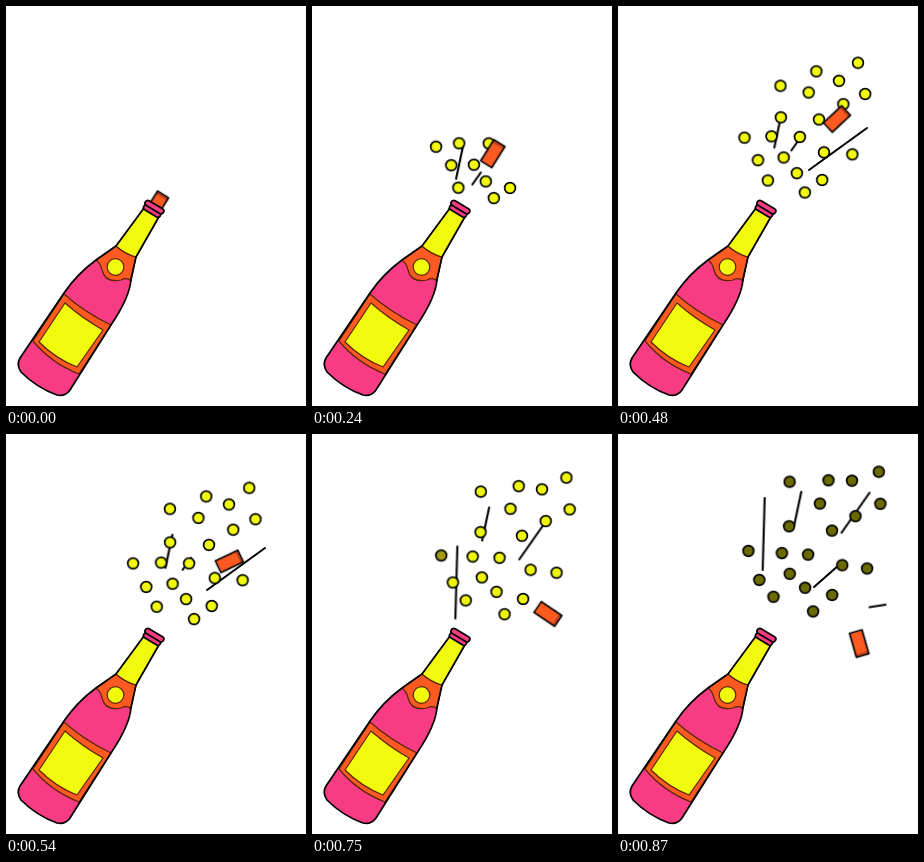
An HTML page without scripts that plays this animation: 300x400 px, repeating every 0.9 s.

```html
<!DOCTYPE html>
<html lang="en">
<head>
<meta charset="utf-8">
<title>Popping bottle</title>
<style>
  html, body { margin: 0; width: 100%; height: 100%; overflow: hidden; background: #fff; }
  svg { display: block; width: 100%; height: 100%; }

  .pink { fill: #f83c84; }
  .orange { fill: #fc5a21; }
  .yellow { fill: #f1f90d; }
  .ink { stroke: #000; stroke-width: 1.7; stroke-linejoin: round; stroke-linecap: round; }
  .thin { stroke: #5a2408; stroke-width: 1.2; stroke-linejoin: round; }
  .streaks { stroke-width: 2.1; }

  .dots, .streaks, .dots *, .streaks *, .cork {
    animation: 0.9s -2ms infinite;
  }

  /* Steady drift; --dx and --dy are the travel in one loop, drawn as placed at 70%. */
  .dots circle, .streaks path {
    animation-name: drift;
    animation-timing-function: steps(30);
  }
  .dots circle { r: 5.4px; }
  @keyframes drift {
    from { transform: translate(calc(var(--dx) * -0.7px), calc(var(--dy) * -0.7px)); }
    to { transform: translate(calc(var(--dx) * 0.3px), calc(var(--dy) * 0.3px)); }
  }

  .dots { fill: #f1f90d; animation-name: dim; animation-timing-function: linear; }
  .dots .early { animation-name: drift, dim-early; animation-timing-function: steps(30), linear; }
  @keyframes dim {
    0%, 83.3% { fill: #f1f90d; }
    95%, 100% { fill: #6b6a00; }
  }
  @keyframes dim-early {
    0%, 76.7% { fill: #f1f90d; }
    83.3% { fill: #a39d15; }
    90%, 100% { fill: #6b6a00; }
  }

  /* Hard appearances */
  .dots g, .streaks g { animation-timing-function: step-end; }
  .dots .first, .streaks .first { animation-name: first; }
  .dots .second { animation-name: second; }
  .dots .third { animation-name: third; }
  .streaks .spark { animation-name: spark; }
  .streaks .ray { animation-name: ray; }
  .streaks .fourth { animation-name: fourth; }
  .streaks .fifth { animation-name: fifth; }
  .streaks .last { animation-name: last; }
  @keyframes first { 0% { opacity: 0; } 16.6%, 100% { opacity: 1; } }
  @keyframes second { 0% { opacity: 0; } 33.3%, 100% { opacity: 1; } }
  @keyframes third { 0% { opacity: 0; } 46.6%, 100% { opacity: 1; } }
  @keyframes spark { 0% { opacity: 0; } 16.6% { opacity: 1; } 63.3%, 100% { opacity: 0; } }
  @keyframes ray { 0% { opacity: 0; } 33.3% { opacity: 1; } 63.3%, 100% { opacity: 0; } }
  @keyframes fourth { 0% { opacity: 0; } 63.3%, 100% { opacity: 1; } }
  @keyframes fifth { 0% { opacity: 0; } 76.6%, 100% { opacity: 1; } }
  @keyframes last { 0% { opacity: 0; } 86.6%, 100% { opacity: 1; } }

  .cork { animation-name: fly; }
  @keyframes fly {
    0% { transform: translate(150.5px, 199px) rotate(32deg); animation-timing-function: steps(12); }
    40% { transform: translate(196px, 122px) rotate(32deg); animation-timing-function: steps(2); }
    46.667% { transform: translate(207px, 110px) rotate(34deg); animation-timing-function: steps(2); }
    53.333% { transform: translate(219px, 113px) rotate(47deg); animation-timing-function: steps(5); }
    70% { transform: translate(230px, 149px) rotate(91deg); animation-timing-function: steps(4); }
    83.333% { transform: translate(236px, 180px) rotate(124deg); animation-timing-function: steps(5); }
    100% { transform: translate(242.5px, 217px) rotate(174deg); }
  }
</style>
</head>
<body>
<svg viewBox="0 0 300 400">
  <g class="streaks ink" fill="none">
    <g class="first"><path d="M171 89 164 122" style="--dx:46;--dy:-117"/></g>
    <g class="spark"><path d="M190 111 181.5 123" style="--dx:49;--dy:-128"/></g>
    <g class="ray"><path d="M274 102 216 144" style="--dx:150;--dy:-120"/></g>
    <g class="fourth">
      <path d="M219 112 191 152" style="--dx:122;--dy:-200"/>
      <path d="M219 184 203 186.5" style="--dx:182;--dy:-50"/>
    </g>
    <g class="fifth"><path d="M144 161 142 233" style="--dx:10;--dy:-364"/></g>
    <g class="last"><path d="M189 159 164 181" style="--dx:120;--dy:-105"/></g>
  </g>

  <g class="dots ink">
    <g class="first">
      <circle class="early" cx="128" cy="126" style="--dx:9;--dy:-34"/>
      <circle cx="157.5" cy="126" style="--dx:24;--dy:-26"/>
      <circle cx="185" cy="127" style="--dx:19;--dy:-24"/>
      <circle cx="140.5" cy="151" style="--dx:3;--dy:-19"/>
      <circle cx="168" cy="147" style="--dx:14;--dy:-27"/>
      <circle cx="182" cy="162" style="--dx:19;--dy:-31"/>
      <circle cx="152" cy="170" style="--dx:13;--dy:-27"/>
      <circle cx="190" cy="183" style="--dx:19;--dy:-21"/>
      <circle cx="208" cy="169" style="--dx:23;--dy:-30"/>
    </g>
    <g class="second">
      <circle cx="166" cy="104" style="--dx:19;--dy:-44"/>
      <circle cx="195" cy="80" style="--dx:26;--dy:-39"/>
      <circle cx="230" cy="92" style="--dx:28;--dy:-37"/>
      <circle cx="213" cy="140.5" style="--dx:42;--dy:-35"/>
      <circle cx="240" cy="143" style="--dx:34;--dy:-32"/>
    </g>
    <g class="third">
      <circle cx="166" cy="67.5" style="--dx:21;--dy:-74"/>
      <circle cx="203" cy="58" style="--dx:28;--dy:-44"/>
      <circle cx="226" cy="64" style="--dx:30;--dy:-65"/>
      <circle cx="248" cy="49.5" style="--dx:48;--dy:-44"/>
      <circle cx="253" cy="81" style="--dx:35;--dy:-42"/>
      <circle cx="206" cy="107" style="--dx:30;--dy:-39"/>
    </g>
  </g>

  <g class="cork">
    <rect class="orange" x="-6.5" y="-12.5" width="13" height="25"/>
    <rect fill="#b8401a" x="-6.5" y="-12.5" width="13" height="3"/>
    <rect class="ink" fill="none" x="-6.5" y="-12.5" width="13" height="25"/>
  </g>

  <g class="bottle">
    <path class="pink" d="M138 202 110 240 90 254Q71 268 58 287L14 352Q10 359 15 366 31 382 51 389 59 391 64 384L105 319Q124 291 125 273L130 251 154 209Z"/>
    <path class="orange thin" d="M110 240Q119 248 130 251L125 275Q121 271 115 274 99 277 96 264 95 258 90 254Z"/>
    <path class="yellow thin" d="M138 202 110 240Q119 248 130 251L154 209Z"/>
    <circle class="yellow thin" cx="109.5" cy="261" r="8.3"/>
    <path class="orange thin" d="M58 288Q78 306 105 319L73 368Q45 357 27 335Z"/>
    <path class="yellow thin" d="M59 297Q76 312 97 324L71 361Q50 353 33 336Z"/>
    <path class="ink" fill="none" d="M138 202 110 240 90 254Q71 268 58 287L14 352Q10 359 15 366 31 382 51 389 59 391 64 384L105 319Q124 291 125 273L130 251 154 209"/>
    <g class="pink ink" transform="translate(147 203.5) rotate(31)">
      <rect x="-9.5" y="-1" width="19" height="5.5" rx="2.5"/>
      <rect x="-10.5" y="-5.5" width="21" height="5.5" rx="2.7"/>
    </g>
  </g>
</svg>
</body>
</html>
```
